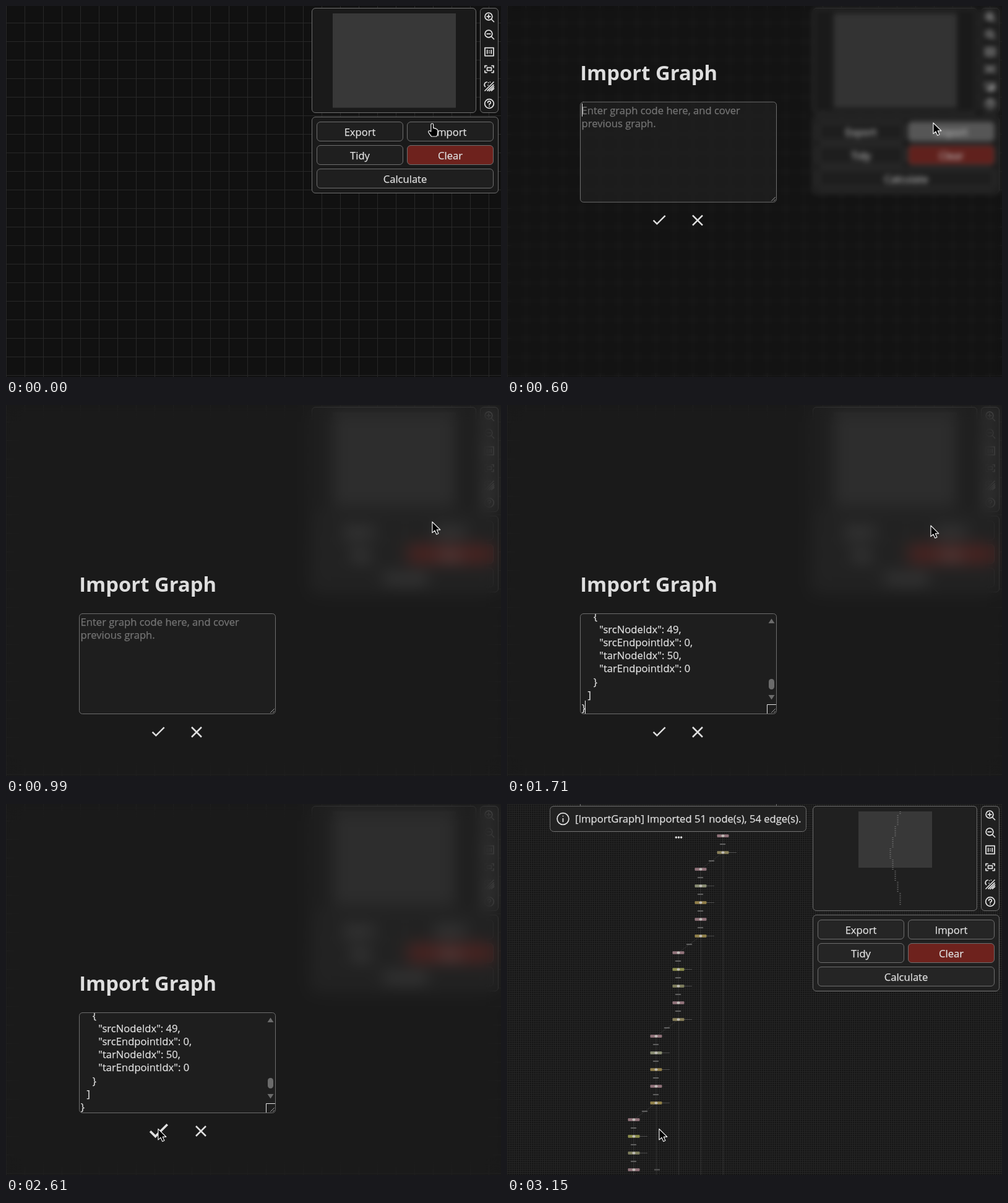
Recreate the animation shown at these times as an HTML page. Size 800 by 600 pixels, loop 3.45 s.

```html
<!DOCTYPE html>
<html lang="en">
<head>
<meta charset="utf-8">
<title>Import Graph</title>
<style>
  html, body { margin: 0; width: 100%; height: 100%; overflow: hidden; background: #111; }
  #stage { position: relative; width: 800px; height: 600px; overflow: hidden; }
  #stage > * { position: absolute; left: 0; top: 0; width: 800px; height: 600px; }
  svg { display: block; fill: none; stroke-linecap: round; stroke-linejoin: round; }
  text { font: 16.6px "Open Sans", "Noto Sans", sans-serif; fill: #e0e0e0; stroke: #e0e0e0; stroke-width: .25; white-space: pre; }
  .mid { text-anchor: middle; }
  .title { font-size: 32.8px; font-weight: 700; fill: #dedede; stroke: none; }
  .hint { fill: #757575; stroke: #757575; }
  .box { stroke: #6e6e6e; }
  .icon { stroke: #e0e0e0; stroke-width: 1.75; }
  .mark { stroke: #e0e0e0; stroke-width: 2.5; stroke-linecap: butt; stroke-linejoin: miter; }
  .pointer { fill: #000; stroke: #f0f0f0; stroke-width: 1.2; }
</style>
</head>
<body>
<div id="stage">
  <svg viewBox="0 0 800 600">
    <defs>
      <pattern id="coarse" width="30" height="30" y="27" patternUnits="userSpaceOnUse">
        <path d="M0 0H30V1H1V30H0Z" fill="#282828"/>
      </pattern>
      <pattern id="fine" width="3" height="3" patternUnits="userSpaceOnUse">
        <path d="M0 0H3V1H1V3H0Z" fill="#272727"/>
      </pattern>
    </defs>
    <rect width="800" height="600" fill="#111"/>
    <rect id="grid" width="800" height="600"/>
    <g id="graph"></g>
    <g id="panels"></g>
    <g id="minimap"></g>
    <g id="buttons"></g>
    <g class="icon">
      <g id="zoomIn"><circle cx="780" cy="17" r="5.9"/><path d="M784.5 21.5L788.5 25.5M777.2 17H782.8"/></g>
      <path d="M780 14.2V19.8"/>
      <use href="#zoomIn" y="28"/>
      <path d="M774 67.5H788V80.5H774ZM777.7 71.5V76.5M784.3 71.5V76.5M781 72.6V72.7M781 75.5V75.6" stroke-linecap="square"/>
      <path d="M774 99.5V96.5H777M785 96.5H788V99.5M788 104.5V107.5H785M777 107.5H774V104.5M777.5 99.7H784.5V104.3H777.5Z"/>
      <path d="M788 123L774 137M777 123A4.4 4.4 0 0 0 774.5 130.5M779.7 124V124.1M782.5 123V123.1M779 128V128.1M778 137L788 127.5M781 137.3L788.5 130.5M784.5 137L788.5 133.5"/>
      <circle cx="781" cy="158" r="7.3"/>
      <path d="M778.7 156.2A2.3 2.3 0 1 1 781 158.5V159.4M781 161.8V161.9"/>
    </g>
  </svg>

  <div id="veil"></div>

  <svg viewBox="0 0 800 600">
    <defs><clipPath id="inner"><rect x="119" y="338" width="316" height="161" rx="4"/></clipPath></defs>
    <g id="modal">
      <text class="title" x="118.2" y="302">Import Graph</text>
      <rect class="box" x="118.5" y="337.5" width="317" height="162" rx="5" fill="#222" fill-opacity=".7"/>
      <g id="empty">
        <text class="hint" x="120.6" y="357">Enter graph code here, and cover</text>
        <text class="hint" x="120.6" y="378">previous graph.</text>
      </g>
      <g id="filled">
        <g id="code" clip-path="url(#inner)"></g>
        <path d="M422.5 353L427.5 345.5L432.5 353ZM422.5 469L427.5 476.5L432.5 469Z" fill="#6b6b6b"/>
        <rect x="423" y="443" width="9" height="17" rx="4.5" fill="#6b6b6b"/>
        <path d="M420.5 498.5V484.5H434.5" stroke="#e4e4e4"/>
      </g>
      <path d="M427.5 497.5L433.5 491.5M431.5 497.5L433.5 495.5" stroke="#a0a0a0"/>
      <rect id="caret" width="1" height="21" fill="#f0f0f0"/>
      <g id="actions">
        <path id="check" class="mark" d="M236.6 528.8L242.4 534.6L255.7 521.3"/>
        <path id="cross" class="mark" d="M300 521L316 537M316 521L300 537"/>
      </g>
      <path id="dots" d="M273.3 529H273.4M277.4 529H277.5M281.6 529H281.7" stroke="#e0e0e0" stroke-width="3.4"/>
    </g>
    <g id="toast">
      <rect class="box" x="69.5" y="3.5" width="414" height="41" rx="6" fill="#222"/>
      <g class="icon"><circle cx="90.5" cy="24" r="9.4"/><path d="M90.5 23.5V28.5M90.5 19.5V19.6"/></g>
      <text x="110" y="30">[ImportGraph] Imported 51 node(s), 54 edge(s).</text>
    </g>
    <path id="hand" class="pointer" d="M686.8 203V192.2Q686.8 190 688.7 190T690.6 192.2V197.6Q692.6 196.8 693.4 198.4Q695.2 197.8 695.8 199.4Q697.8 199.2 697.8 201.6V205Q697.8 208 695.8 211H687.6Q684.6 207.6 682.9 204.4Q682.2 202.4 684 201.8Q685.4 201.6 686.8 203Z"/>
    <path id="arrow" class="pointer" d="M.9 1V18.6L5 15L7.8 21.2L10.9 19.8L8.2 13.8H13.8Z"/>
  </svg>
</div>

<script>
const LOOP = 3450, TICK = 30;
const $ = id => document.getElementById(id);
const clamp = x => Math.max(0, Math.min(1, x));
const ramp = (t, a, b) => clamp((t - a) / (b - a));
const mix = (a, b, p) => a + (b - a) * p;
const show = (id, on) => $(id).setAttribute("visibility", on ? "visible" : "hidden");
const box = (x, y, w, h, fill, id = "") =>
  `<rect class="box" id="${id}" x="${x + .5}" y="${y + .5}" width="${w}" height="${h}" rx="5.5" fill="${fill}"/>`;

// CSS "ease": cubic-bezier(.25, .1, .25, 1), solved by bisection
function ease(x) {
  const curve = (a, b, u) => 3 * a * u * (1 - u) ** 2 + 3 * b * u * u * (1 - u) + u ** 3;
  let lo = 0, hi = 1;
  for (let i = 0; i < 24; i++) {
    const m = (lo + hi) / 2;
    if (curve(.25, .25, m) < x) lo = m; else hi = m;
  }
  return x >= 1 ? 1 : curve(.1, 1, lo);
}

function buildPanels() {
  $("panels").innerHTML = [[494, 3, 265, 169], [766, 3, 29, 169], [494, 179, 301, 123]]
    .map(r => box(...r, "inherit")).join("");
  $("buttons").innerHTML = [
    ["Export", 502, 187, 139], ["Import", 648, 187, 139],
    ["Tidy", 502, 225, 139], ["Clear", 648, 225, 139], ["Calculate", 502, 263, 285]
  ].map(([name, x, y, w]) =>
    box(x, y, w, 31, name === "Clear" ? "#6e221d" : "inherit", "btn" + name) +
    `<text class="mid" x="${x + w / 2 + .5}" y="${y + 23}">${name}</text>`).join("");
}

function buildMinimap() {
  let dots = "";
  for (let y = 12; y <= 163; y += 3) {
    const k = Math.min(8, Math.round((y - 79) / 17.8) + 4);
    dots += `M${618.5 + 4 * Math.abs(k - 4)} ${y + .5}h2`;
  }
  $("minimap").innerHTML = `<rect id="view" fill="#383838"/>
    <path id="track" d="${dots}" stroke="#777" stroke-linecap="butt"/>`;
}

function buildGraph() {
  const pink = "#93747c";
  const tones = [pink, "#8a815a", pink, "#8b8f74", "#93804a", pink, "#93834a", pink, "#8d8f4c", "#80805e"];
  const colX = i => 349 - 36 * Math.floor((i + 3) / 5);
  let edges = "", nodes = "";
  const label = (x, y) => `<rect x="${x - 5}" y="${y - 1}" width="9" height="2" fill="#5c5c5c"/>`;
  for (let i = 0; i <= 20; i++) {
    const x = colX(i), y = 51.5 + 27 * i, next = colX(i + 1);
    edges += `M${x} ${y}L${next} ${y + 27}`;
    if (next !== x) edges += `M${x + .5} ${y}V600`;
    if (i % 5 !== 0 && i % 5 !== 2)
      nodes += `<rect x="${x + 9}" y="${y - .5}" width="13" height="1" fill="#555"/>`;
    if (i < 20) nodes += label((x + next) / 2, y + 13.5);
    nodes += `<rect x="${x - 9.5}" y="${y - 2.2}" width="19" height="4.4" rx="1" fill="${tones[i % 10]}"/>
      <ellipse cx="${x}" cy="${y}" rx="2.5" ry="2" fill="#c0bdb8"/>`;
  }
  $("graph").innerHTML = `<path d="${edges}" stroke="#fff" stroke-opacity=".09"/>` + nodes + label(243, 591.5);
}

function buildCode() {
  const lines = [[139.8, "{"], [149.3, '"srcNodeIdx": 49,'], [149.3, '"srcEndpointIdx": 0,'],
    [149.3, '"tarNodeIdx": 50,'], [149.3, '"tarEndpointIdx": 0'], [139.8, "}"], [130.4, "]"], [120.8, "}"]];
  $("code").innerHTML = lines.map(([x, s], i) =>
    `<text x="${x}" y="${Math.round(347.8 + 21.15 * i)}">${s}</text>`).join("");
}

function modalY(t) {
  if (t >= 3150) return -475;
  if (t >= 2700) return -600 * ease(ramp(Math.min(t, 2910), 2675, 3290));
  return -600 * (1 - ease(ramp(t, 348, 963)));
}

function setView(done) {
  const [x, y, w, h] = done ? [568, 12, 119, 91] : [528, 12, 199, 152.5];
  Object.entries({ x, y, width: w, height: h }).forEach(([k, v]) => $("view").setAttribute(k, v));
  $("grid").setAttribute("fill", done ? "url(#fine)" : "url(#coarse)");
  $("panels").setAttribute("fill", done ? "#202020" : "#1a1a1a");
  $("buttons").setAttribute("fill", done ? "#252525" : "#1f1f1f");
  ["graph", "track", "toast"].forEach(id => show(id, done));
}

function pointer(t) {
  const k = ramp(t, 1676, 2040), u = k * k * (3 - 2 * k);
  const bend = (a, b, c) => a * (1 - u) ** 2 + 2 * b * u * (1 - u) + c * u * u;
  $("arrow").setAttribute("transform", `translate(${bend(688, 610, 245)} ${bend(188, 310, 524.5)})`);
  show("hand", t < 570);
  show("arrow", t >= 570);
}

function draw(t) {
  const done = t >= 3150, pasted = t >= 1380, sent = t >= 2700;
  setView(done);

  const hover = ramp(t, 0, 150) * (1 - ramp(t, 540, 800));
  const grey = Math.round(mix(31, 118, hover));
  $("btnImport").style.fill = hover ? `rgb(${grey},${grey},${grey})` : "";

  const veil = ramp(t, 540, 720) * (1 - ramp(t, 2680, 2890));
  $("veil").style.background = `rgba(34,34,34,${veil * .5})`;
  $("veil").style.backdropFilter = veil ? `blur(${veil * 13}px)` : "none";

  $("modal").setAttribute("transform", `translate(0 ${modalY(t).toFixed(2)})`);
  show("empty", !pasted);
  show("filled", pasted && !done);
  show("actions", !sent);
  show("dots", sent);
  show("caret", t < 990 || (pasted && t < 1890) || (t >= 2400 && t < 2460));
  $("caret").setAttribute("x", pasted ? 126 : 121);
  $("caret").setAttribute("y", pasted ? 478 : 340);

  const grow = ramp(t, 1920, 2040), size = 1 + .45 * grow;
  $("check").setAttribute("transform", `translate(${246 + .7 * grow} 528) scale(${size}) translate(-246 -528)`);
  $("cross").setAttribute("transform", `translate(${7 * grow} 0)`);
  pointer(t);
}

buildPanels();
buildMinimap();
buildGraph();
buildCode();
const start = performance.now();
function loop() {
  const t = (performance.now() - start) % LOOP;
  draw(Math.floor(t / TICK) * TICK);
  requestAnimationFrame(loop);
}
loop();
</script>
</body>
</html>
```
